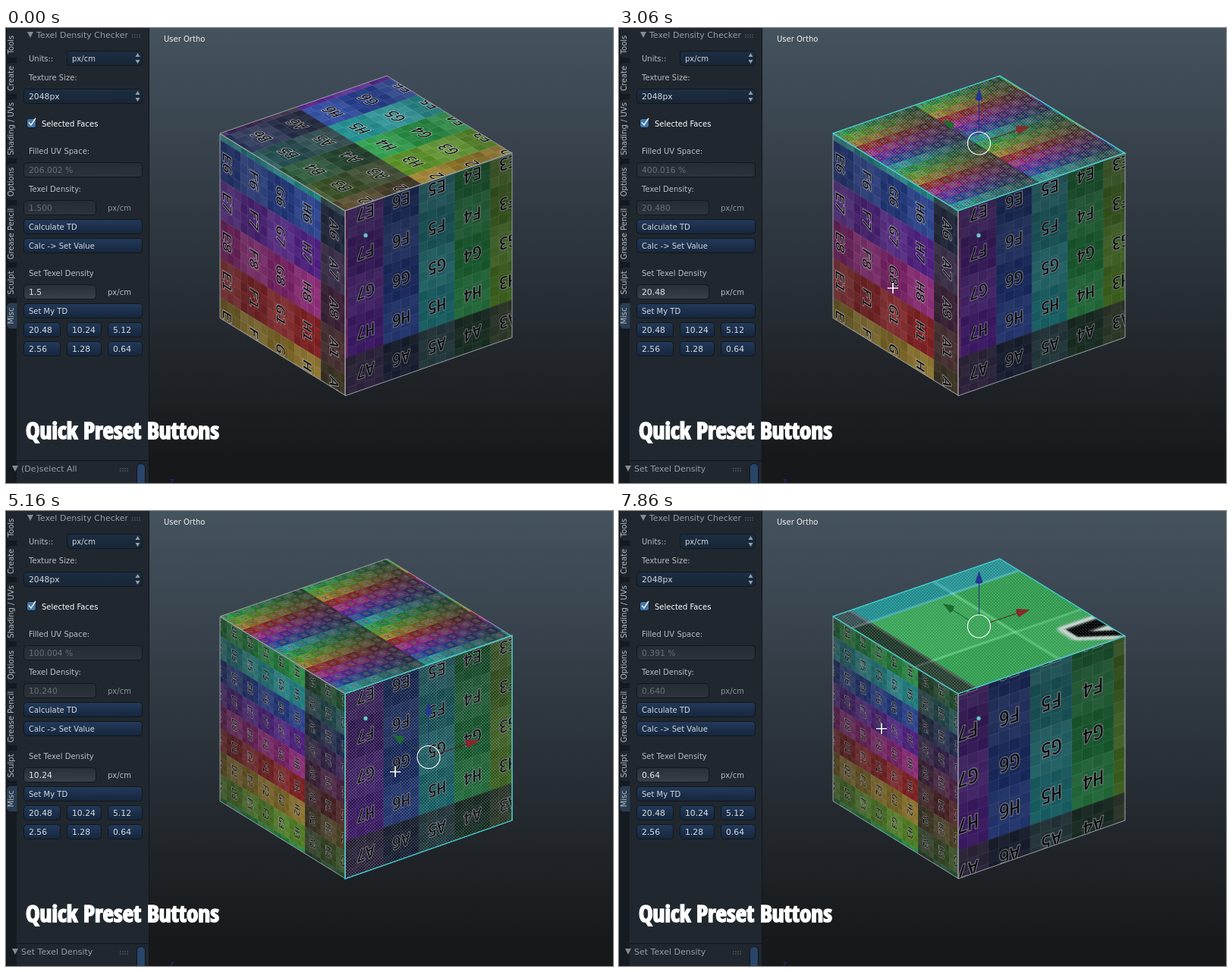
Write an HTML page with a canvas that moves like this. It is 800 by 600 pixels and loops after 8000 ms.

```html
<!DOCTYPE html>
<html lang="en">
<head>
<meta charset="utf-8">
<title>Quick Preset Buttons</title>
<style>
html, body { margin: 0; width: 100%; height: 100%; overflow: hidden; background: #17181a; }
#stage { position: relative; width: 800px; height: 600px; overflow: hidden;
  background: linear-gradient(#45535f, #2b333b 50%, #17181a 95%); }
canvas, svg { position: absolute; left: 0; top: 0; display: block; }
text { font: 10px "DejaVu Sans", sans-serif; white-space: pre; }
text.num { font-size: 10.8px; }
text.head { font-size: 11px; }
#caption { font: 900 34px Impact, "Open Sans Condensed", "Noto Sans ExtraCondensed", "Roboto Condensed",
  "DejaVu Sans Condensed", "Noto Sans", "Open Sans", sans-serif; font-stretch: 62.5%; }
</style>
</head>
<body>
<div id="stage">
<canvas id="view" width="800" height="600"></canvas>
<svg width="800" height="600" viewBox="0 0 800 600">
  <defs>
    <linearGradient id="blue" x2="0" y2="1"><stop stop-color="#223a5a"/><stop offset="1" stop-color="#16263d"/></linearGradient>
    <linearGradient id="hover" x2="0" y2="1"><stop stop-color="#47617f"/><stop offset="1" stop-color="#304761"/></linearGradient>
    <linearGradient id="press" x2="0" y2="1"><stop stop-color="#2d68a8"/><stop offset="1" stop-color="#4a8dcf"/></linearGradient>
    <linearGradient id="menu" x2="0" y2="1"><stop stop-color="#1c2e43"/><stop offset="1" stop-color="#182636"/></linearGradient>
    <linearGradient id="field" x2="0" y2="1"><stop stop-color="#292f36"/><stop offset="1" stop-color="#3a4047"/></linearGradient>
    <linearGradient id="off" x2="0" y2="1"><stop stop-color="#262c33"/><stop offset="1" stop-color="#2c333a"/></linearGradient>
  </defs>
  <circle cx="474" cy="273.5" r="3" fill="#76c3cf" stroke="#1d3e48" stroke-width=".7"/>
  <g id="gizmo">
    <g fill="none" stroke-width="1">
      <path d="M0-15V-57" stroke="#26368c"/>
      <path d="M14-5L50-17" stroke="#5c2424"/>
      <path d="M-13-8L-37-23" stroke="#1e5a2c"/>
      <circle r="15" stroke="#fff" stroke-width="1.1"/>
    </g>
    <path d="M0-73L5-58Q0-54-5-58Z" fill="#26368f"/>
    <path d="M67-22L53-12Q48-16 49-23Z" fill="#842b2b"/>
    <path d="M-48-30L-33-27Q-33-20-38-18Z" fill="#1d6b32"/>
  </g>
  <g id="panel"></g>
  <text x="208" y="18" fill="#f2f2f2">User Ortho</text>
  <text x="216" y="601" fill="#2b2ba0">z</text>
  <text id="caption" x="26" y="542" fill="#fff" stroke="#fff" stroke-width="1.7">Quick Preset Buttons</text>
  <g id="cross" fill="none">
    <path d="M-7 0H7M0-7V7" stroke="#000" stroke-opacity=".45" stroke-width="3.4"/>
    <path d="M-7 0H7M0-7V7" stroke="#fff" stroke-width="1.7"/>
  </g>
  <path id="arrow" d="M0 0V16L4 12.6L6.6 18.6L9.2 17.5L6.6 11.6H11.6Z" fill="#fff" stroke="#111" stroke-width=".8"/>
</svg>
</div>
<script>
const LOOP = 8000, CELL = 128, SIZE = CELL * 8;
const $ = id => document.getElementById(id);

// ---------- side panel ----------
const box = (x, y, w, h, fill, r = 4, id = '') =>
  `<rect ${id && `id="${id}"`} x="${x}" y="${y}" width="${w}" height="${h}" rx="${r}" fill="${fill}" stroke="#12171c"/>`;
const label = (x, y, s, fill = '#b9bdc0', cls = '', id = '') =>
  `<text ${id && `id="${id}"`} class="${cls}" x="${x}" y="${y}" fill="${fill}">${s}</text>`;
const button = (y, s) => box(23.5, y, 156, 19, 'url(#blue)') + label(30, y + 13.5, s, '#d3d8dc');
const fold = (x, y) => `<path d="M${x - 4} ${y - 4}h8l-4 8z" fill="#868b8f"/>`;
const grip = (x, y) => `<path d="M${x} ${y}h11M${x} ${y + 3}h11" stroke="#747a80" stroke-dasharray="1.4 1.8"/>`;
const spin = y => `<path d="M170.5 ${y - 2}h6l-3-5zM170.5 ${y + 2}h6l-3 5z" fill="#93a0ad"/>`;

const presets = ['20.48', '10.24', '5.12', '2.56', '1.28', '0.64'];
const columns = [[23.5, 48], [80.5, 45], [134.5, 45]];
const tabs = [['Tools', -4, 40], ['Create', 45, 88], ['Shading / UVs', 93, 173], ['Options', 178, 228],
  ['Grease Pencil', 233, 310], ['Sculpt', 315, 357], ['Misc', 362, 397]];

$('panel').innerHTML =
  '<rect width="188.5" height="600" fill="#20272f"/><rect width="14" height="600" fill="#161b21"/>' +
  '<path d="M188.5 0V600M14 570.5H188" stroke="#11161b"/>' +
  tabs.map(([s, a, b], i) =>
    `<path d="M14.5 ${a}H4L.5 ${a + 4}V${b - 4}L4 ${b}H14.5" fill="${i == 6 ? '#2a3d52' : '#1f262e'}" stroke="#0e1216"/>` +
    `<text transform="translate(10 ${(a + b) / 2 + (i ? 0 : 4)}) rotate(-90)" text-anchor="middle" fill="#b9bdc0">${s}</text>`).join('') +
  fold(32, 9) + label(40, 13, 'Texel Density Checker', '#979ca0', 'head') + grip(166, 9) +
  label(30, 44, 'Units::') + box(80.5, 30.5, 99, 19, 'url(#menu)') + label(87, 44, 'px/cm', '#d3d8dc') + spin(40) +
  label(30, 69, 'Texture Size:') + box(23.5, 80.5, 156, 19, 'url(#menu)') + label(30, 94, '2048px', '#d3d8dc', 'num') + spin(90) +
  box(27.5, 119.5, 12, 12, '#4177a8', 3) +
  '<path d="M30 124.5L33 128L39 119" fill="none" stroke="#e8eef2" stroke-width="1.6"/>' +
  label(47, 130, 'Selected Faces', '#fff') +
  label(30, 166, 'Filled UV Space:') + box(23.5, 177.5, 156, 19, 'url(#off)') + label(30, 191, '', '#686f75', 'num', 'filled') +
  label(30, 216, 'Texel Density:') + box(23.5, 227.5, 95, 19, 'url(#off)') + label(30, 241, '', '#686f75', 'num', 'density') +
  label(134, 241, 'px/cm', '#8d9398') +
  button(252.5, 'Calculate TD') + button(277.5, 'Calc -&gt; Set Value') +
  label(30, 327, 'Set Texel Density') + box(23.5, 338.5, 95, 19, 'url(#field)') + label(30, 352, '', '#dfe4e6', 'num', 'value') +
  label(134, 352, 'px/cm') + button(363.5, 'Set My TD') +
  presets.map((s, i) => {
    const [x, w] = columns[i % 3], y = i < 3 ? 388.5 : 413.5;
    return box(x, y, w, 19, 'url(#blue)', 4, 'preset' + i) + label(x + 6.5, y + 13.5, s, '#d8dde1', 'num');
  }).join('') +
  fold(12, 581) + label(20, 585, '', '#979ca0', 'head', 'operator') + grip(150, 581) +
  box(172.5, 574.5, 11, 40, '#29456a', 5);

// shrink the caption if no condensed face is installed
const capWidth = $('caption').getComputedTextLength();
if (capWidth > 255) $('caption').style.fontSize = 34 * 255 / capWidth + 'px';

// ---------- colour grid texture ----------
function makeGrid() {
  const tile = document.createElement('canvas');
  tile.width = tile.height = SIZE;
  const g = tile.getContext('2d');
  for (let i = 0; i < 8; i++) {
    const shade = g.createLinearGradient(0, 0, 0, SIZE);
    shade.addColorStop(0, `hsl(${i * 45},100%,25%)`);
    shade.addColorStop(1, `hsl(${i * 45},100%,5%)`);
    g.fillStyle = shade;
    g.fillRect(i * CELL, 0, CELL, SIZE);
  }
  g.globalCompositeOperation = 'lighter';
  const add = (v, x, y, w, h) => { g.fillStyle = `rgb(${v},${v},${v})`; g.fillRect(x, y, w, h); };
  add(42, 0, 0, SIZE, SIZE);
  for (const [step, v] of [[32, 9], [CELL, 19]])
    for (let y = 0; y < SIZE; y += step)
      for (let x = 0; x < SIZE; x += step)
        if ((x + y) / step % 2) add(v, x, y, step, step);
  for (let p = 0; p < SIZE; p += 32) {
    add(45, p, 0, 1, SIZE);
    add(45, 0, p + 31, SIZE, 1);
  }
  g.globalCompositeOperation = 'source-over';
  g.font = '54px "DejaVu Sans Mono", monospace';
  g.textAlign = 'center';
  g.lineJoin = 'round';
  g.lineWidth = 5;
  g.strokeStyle = 'rgba(255,255,255,.85)';
  g.fillStyle = '#000';
  for (let y = 0; y < 8; y++)
    for (let x = 0; x < 8; x++) {
      const s = 'HGFEDCBA'[y] + (x + 1), px = (x + .5) * CELL, py = (y + .5) * CELL + 20;
      g.strokeText(s, px, py);
      g.fillText(s, px, py);
    }
  return tile;
}

// ---------- cube ----------
// right, down: screen directions of the texture axes; at: cell under the face centre
const faces = [
  { mid: [474.5, 152], right: [-165, -102], down: [220, -76], at: [3.83, .195], dim: .16 },
  { mid: [364.5, 312], right: [0, 243], down: [-165, -102], at: [7.19, 1.433], dim: .28 },
  { mid: [557, 324.5], right: [-220, 77], down: [0, -244], at: [4.73, 1.39], dim: .47 }
];
const grid = makeGrid(), ctx = $('view').getContext('2d');
const dot = document.createElement('canvas');
dot.width = dot.height = 4;
const dc = dot.getContext('2d');
dc.fillStyle = 'rgba(205,240,245,.35)';
dc.fillRect(0, 0, 1, 1);
dc.fillRect(2, 2, 1, 1);
const stipple = ctx.createPattern(dot, 'repeat');

function outline({ mid, right, down }) {
  ctx.beginPath();
  for (const [a, b] of [[-.5, -.5], [.5, -.5], [.5, .5], [-.5, .5]])
    ctx.lineTo(mid[0] + a * right[0] + b * down[0], mid[1] + a * right[1] + b * down[1]);
  ctx.closePath();
}

function drawFace(face, cells, selected) {
  const { mid, right, down, at, dim } = face, k = 1 / (cells * CELL);
  ctx.save();
  outline(face);
  ctx.clip();
  ctx.save();
  ctx.imageSmoothingQuality = 'high';
  ctx.transform(right[0] * k, right[1] * k, down[0] * k, down[1] * k, mid[0], mid[1]);
  ctx.translate(-at[0] * CELL, -at[1] * CELL);
  for (let i = -1; i < 2; i++)
    for (let j = -1; j < 2; j++) ctx.drawImage(grid, i * SIZE, j * SIZE);
  ctx.restore();
  ctx.fillStyle = `rgba(4,6,14,${dim})`;
  ctx.fillRect(0, 0, 800, 600);
  if (selected) {
    ctx.fillStyle = stipple;
    ctx.fillRect(0, 0, 800, 600);
  }
  ctx.restore();
}

function drawCube(cells, picked) {
  ctx.clearRect(0, 0, 800, 600);
  faces.forEach((f, i) => drawFace(f, cells[i], i == picked));
  ctx.lineWidth = 1;
  ctx.strokeStyle = '#9a9fa6';
  faces.forEach(f => { outline(f); ctx.stroke(); });
  if (picked >= 0) {
    ctx.lineWidth = 1.3;
    ctx.strokeStyle = '#35d2d2';
    outline(faces[picked]);
    ctx.stroke();
  }
}

// ---------- timeline ----------
const START = 4.684;
const values = [
  [0, '1.5', '1.500', '206.002', [START, START, START]],
  [2520, '20.48', '20.480', '400.016', [16, START, START]],
  [4240, '10.24', '10.240', '100.004', [16, 8, START]],
  [5840, '5.12', '5.120', '25.001', [16, 8, 4]],
  [7090, '1.28', '1.280', '1.563', [1, 8, 4]],
  [7550, '0.64', '0.640', '0.391', [.5, 8, 4]]
];
const picks = [[0, -1], [900, 0], [3300, 1], [5080, 2], [6540, 0]];
const presses = [[0, -1], [1740, 0, 'hover'], [2370, 0, 'press'], [2520, -1], [3850, 1, 'hover'], [4070, 1, 'press'],
  [4240, -1], [5540, 2, 'hover'], [5770, 2, 'press'], [5840, 2, 'hover'], [5920, -1], [6930, 4, 'hover'],
  [7010, 4, 'press'], [7090, -1], [7160, 5, 'hover'], [7470, 5, 'press'], [7550, -1]];
const path = [[270, 554, 444], [500, 505, 300], [730, 514, 171], [1130, 514, 171], [1740, 56, 416], [1820, 47, 404],
  [2050, 48, 405], [2220, 48, 400], [2520, 48, 400], [2970, 363, 347], [3045, 361, 343], [3310, 361, 343],
  [3920, 103, 397], [4240, 103, 397], [4540, 455, 382], [4780, 575, 330], [5000, 570, 335], [5080, 570, 335],
  [5620, 158, 400], [5860, 158, 400], [6390, 480, 190], [6710, 480, 190], [6860, 106, 333], [7010, 103, 420],
  [7090, 103, 420], [7240, 147, 420], [7550, 147, 420], [7845, 346, 287], [8000, 346, 287]];
const moves = [[270], [1130], [2220], [3230], [4240], [5080], [5770], [6710], [7470]];
const arrows = [[0, false], [1130, true], [2220, false], [3230, true], [3850, false], [6710, true], [7470, false]];

const last = (list, t) => list.findLast(e => e[0] <= t);

// the pointer advances in steps of 75 ms from the start of each move
function pointer(t) {
  const from = last(moves, t)[0];
  t = from + Math.floor((t - from) / 75 + .05) * 75;
  const i = Math.min(path.findLastIndex(p => p[0] <= t), path.length - 2);
  const a = path[i], b = path[i + 1], k = (t - a[0]) / (b[0] - a[0]);
  return [1, 2].map(n => Math.round(a[n] + (b[n] - a[n]) * k));
}

const place = (id, p) => {
  $(id).style.display = p ? '' : 'none';
  if (p) $(id).setAttribute('transform', `translate(${p})`);
};

let shown = '';
function render(t) {
  const [, value, density, filled, cells] = last(values, t);
  const [, picked] = last(picks, t), [, active, look] = last(presses, t);
  const key = value + picked;
  if (key != shown) {
    shown = key;
    drawCube(cells, picked);
    $('value').textContent = value;
    $('density').textContent = density;
    $('filled').textContent = filled + ' %';
    $('operator').textContent = value == '1.5' ? '(De)select All' : 'Set Texel Density';
    place('gizmo', picked < 0 ? null : faces[picked].mid);
  }
  presets.forEach((_, i) => $('preset' + i).setAttribute('fill', `url(#${i == active ? look : 'blue'})`));
  const p = t < 270 ? null : pointer(t);
  const isArrow = p && p[0] < 188 && last(arrows, t)[1];
  place('arrow', isArrow ? p : null);
  place('cross', isArrow ? null : p);
}

const begin = performance.now();
function tick() {
  render((performance.now() - begin) % LOOP);
  requestAnimationFrame(tick);
}
tick();
</script>
</body>
</html>
```
